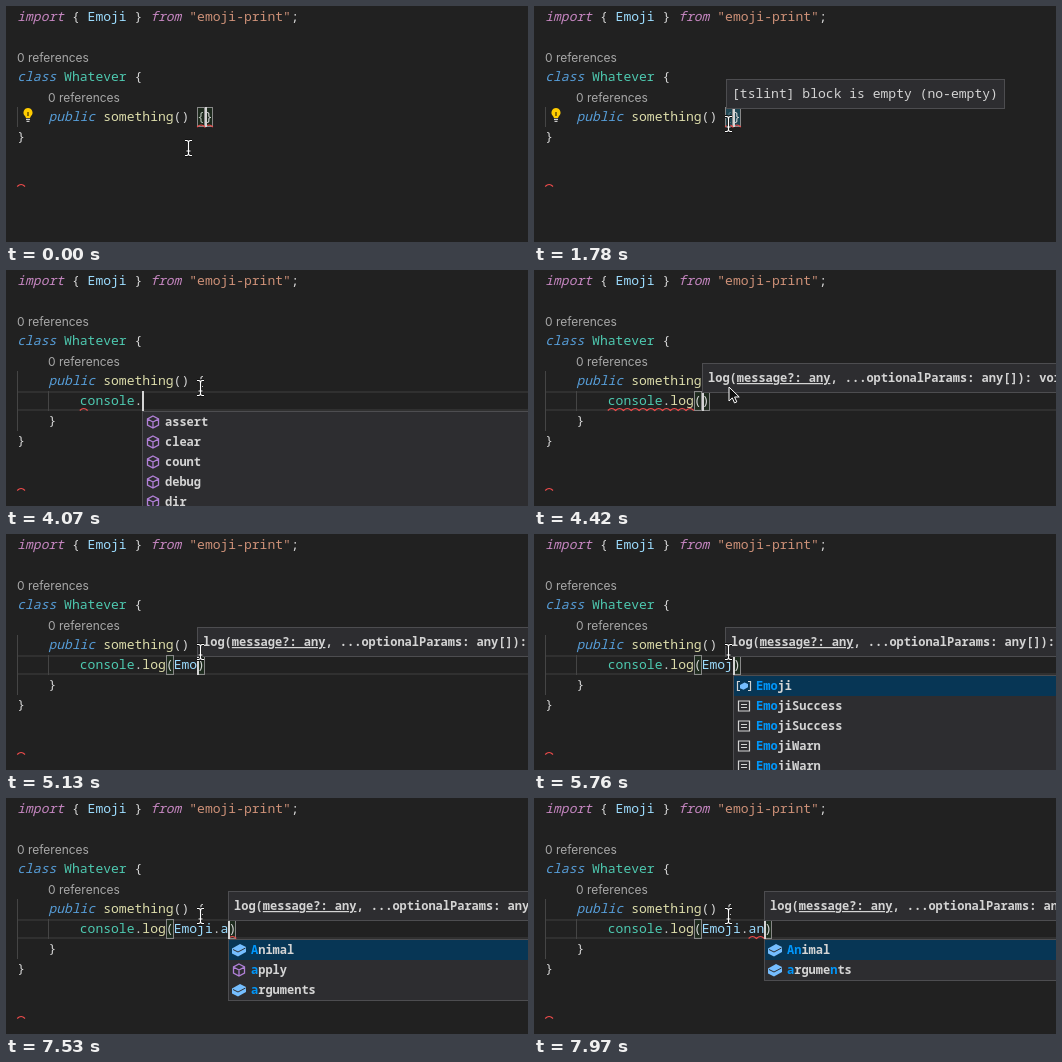
Recreate the animation shown at these times as an HTML page. Size 522 by 236 pixels, loop 8 s.

```html
<!DOCTYPE html>
<html lang="en">
<head>
<meta charset="utf-8">
<title>Code editor typing</title>
<style>
  html, body { margin: 0; width: 100%; height: 100%; overflow: hidden; background: #212121; }
  svg { display: block; width: 522px; height: 236px; }
  text { white-space: pre; font: 13.04px "Noto Sans Mono", "DejaVu Sans Mono", monospace; fill: #d4d4d4; }
  .lens { font: 12px Inter, "Open Sans", sans-serif; fill: #a8a8a8; }
  .small { font-size: 12px; font-weight: 600; }
  .kw, .mod { font-style: italic; }
  .mod { fill: #c586c0; }
  .kw { fill: #569cd6; }
  .type { fill: #4ec9b0; }
  .fn { fill: #dcdcaa; }
  .name { fill: #9cdcfe; }
  .str { fill: #ce9178; }
  .hit { fill: #0097fb; }
  .on { text-decoration: underline; }
  .squiggle { fill: none; stroke: #f14c4c; stroke-width: 1.1; }
  .pair { fill: #00640022; stroke: #888; }
  .guide { stroke: #454545; }
  .current { fill: none; stroke: #303030; stroke-width: 2; }
  .popup, .list { fill: #2d2d30; stroke: #4d4d50; }
  .picked { fill: #073655; }
</style>
</head>
<body>
<svg id="stage" viewBox="0 0 522 236"></svg>
<script>
const LOOP = 8000, CHAR = 7.824, LEFT = 11.2;
const ENTER = 2220;
const stage = document.getElementById('stage');

const TYPED = 'console.log(Emoji.an';
const KEYS = [2750, 2840, 2920, 3010, 3090, 3270, 3450, 3980, 4160, 4240, 4330, 4420,
  4680, 4860, 5040, 5760, 5840, 6290, 7440, 7620];

const CARET_OFF = [[270, 790], [1240, 1780], [2660, 2750], [6730, 7260]];

// Pointer path: time, x, y
const POINTER = [[0, 182.5, 142], [90, 183, 132], [270, 184, 131], [350, 187, 128],
  [440, 190, 124], [520, 193, 120], [610, 194.5, 118]];

// Signature hint: time, column
const HINT = [[0], [4420, 20], [4680, 21], [4860, 22], [5130, 23], [5840, 25],
  [6290, 26], [7530, 27], [7710, 28]];

const LOGGING = ['m assert', 'm clear', 'm count', 'm debug', 'm dir'];
const EMOJI = ['v Emoji', 't EmojiSuccess', 't EmojiSuccess', 't EmojiWarn', 't EmojiWarn'];
const MEMBERS = ['f Animal', 'm apply', 'f arguments', 'm bind', 'f Body'];

// Suggestions: time, column, items, query, first row selected
const LISTS = [[0],
  [4070, 16, LOGGING, '', false], [4160, 17, ['m log'], 'l', true],
  [4240, 18, ['m log'], 'lo', true], [4330, 19, ['m log'], 'log', true], [4420],
  [5760, 24, EMOJI, 'emo', true], [5840, 25, EMOJI, 'emoji', true], [6290],
  [6460, 26, MEMBERS, '', false],
  [7530, 27, MEMBERS.slice(0, 3), 'a', true],
  [7710, 28, ['f Animal', 'f arguments'], 'an', true]];

// Error underline on the typed row: time, first column, last column
const ERRORS = [[0], [3450, 8, 9], [4240, 8, 19], [4590], [6460, 20, 26], [6550, 26, 27],
  [7440, 27, 28], [7620, 28, 29], [7880], [7970, 26, 28]];

const at = (steps, t) => steps.findLast(s => s[0] <= t);
const colX = c => LEFT + c * CHAR;
const span = (cls, s) => `<tspan class="${cls}">${s}</tspan>`;
const text = (x, y, s, cls = '') => `<text x="${x}" y="${y}" class="${cls}">${s}</text>`;
const code = (col, row, s, cls) => text(colX(col), 15 + 20 * row, s, cls);
const rect = (cls, x, y, w, h) => `<rect class="${cls}" x="${x}" y="${y}" width="${w}" height="${h}"/>`;
const line = (cls, x1, y1, x2, y2) =>
  `<path class="${cls}" d="M${x1} ${y1}L${x2} ${y2}"/>`;
const pair = (col, row) => rect('pair', Math.round(colX(col)) + .5, 20 * row + 1.5, 7, 19);

// One hump per character
function squiggle(c1, c2, y) {
  let d = `M${colX(c1)} ${y + 1}`;
  for (let c = c1; c < c2; c++) d += `q${CHAR / 2}-4 ${CHAR} 0`;
  return `<path class="squiggle" d="${d}"/>`;
}

const ICONS = {
  f: `<path fill="#75beff" d="M-7-1.500L1-6L7-3V2L-1 6.500L-7 3.500Z"/>
      <path fill="none" stroke="#2d2d30" d="M-6-.5L-1 2L6.500-2"/>`,
  m: `<path fill="none" stroke="#b180d7" stroke-width="1.3"
      d="M0-6L5.5-3V3L0 6L-5.5 3V-3ZM-5.5-3L0 0L5.5-3M0 0V6"/>`,
  v: `<path fill="none" stroke="#d4d4d4" stroke-width="1.2" d="M-4-4.500H-6.500V4.500H-4M4-4.500H6.500V4.500H4"/>
      <path fill="#75beff" d="M-4-1L.5-3.500L4-2V1.200L-.5 3.800L-4 2.200Z"/>`,
  t: `<path fill="none" stroke="#d4d4d4" stroke-width="1.2"
      d="M-5.500-5H5.500V5H-5.500ZM-3-1.500H3M-3 1.500H3"/>`
};

function marked(word, query) {
  let i = 0;
  return [...word].map(ch => ch.toLowerCase() === query[i] ? (i++, span('hit', ch)) : ch).join('');
}

function list([, col, items, query, picked]) {
  if (!col) return '';
  const x = Math.round(colX(col));
  const rows = items.map((item, i) =>
    `<g transform="translate(${x + 11} ${152 + 20 * i})">${ICONS[item[0]]}</g>` +
    text(x + 23, 156 + 20 * i, marked(item.slice(2), query), 'small'));
  return rect('list', x + .5, 141.5, 430, 20 * items.length + 1) +
    (picked ? rect('picked', x + 1, 142, 430, 20) : '') + rows.join('');
}

function hint([, col]) {
  if (!col) return '';
  const x = Math.round(colX(col));
  return rect('popup', x + .5, 93.5, 430, 29) +
    text(x + 6, 112, `log(${span('on', 'message?: any')}, ...optionalParams: any[]): void`, 'small');
}

function tooltip(t) {
  if (t < 790 || t >= ENTER) return '';
  return `<g opacity="${t < 880 ? .5 : 1}">` + rect('popup', 192.5, 73.5, 278, 29) +
    text(198, 92, '[tslint] block is empty (no-empty)') + '</g>';
}

const BULB = `<path fill="#fc0" d="M22 102a4.6 4.6 0 0 0-3 8l1 2h4l1-2a4.6 4.6 0 0 0-3-8Z"/>
  <path fill="#8a6d00" d="M21 106h2v4h-2Z"/>
  <path stroke="#ccc" stroke-width="1.2" d="M20 113.4H24M20.500 115.400H23.500"/>`;

function pointer(t) {
  if (t >= 4420 && t < 5130)
    return '<path d="M195 117v14l3.300-3.100 2.200 5 2.300-1-2.200-4.900h4.600Z" fill="#111" stroke="#fff"/>';
  const [, x, y] = at(POINTER, t);
  const beam = 'd="M-3.500-7.500H-1.500L0-6.500L1.500-7.500H3.500M0-6.500V6.500M-3.500 7.500H-1.500L0 6.500L1.500 7.500H3.500M-2 3H2"';
  return `<g transform="translate(${x} ${y})" fill="none">
    <path ${beam} stroke="#111" stroke-width="3"/><path ${beam} stroke="#fff" stroke-width="1.2"/></g>`;
}

const HEADER =
  code(0, 0, `${span('mod', 'import')} { ${span('name', 'Emoji')} } ${span('mod', 'from')} ${span('str', '"emoji-print"')};`) +
  text(11, 56, '0 references', 'lens') +
  code(0, 3, `${span('kw', 'class')} ${span('type', 'Whatever')} {`) +
  text(42, 96, '0 references', 'lens') +
  code(4, 5, `${span('kw', 'public')} ${span('fn', 'something')}() {`);

function emptyBody(t) {
  return line('guide', 11.5, 101, 11.5, 121) +
    (t >= 790 ? '<rect x="192" y="101" width="15" height="20" fill="#264f78" opacity=".7"/>' : '') +
    pair(23, 5) + pair(24, 5) + code(24, 5, '}') + squiggle(23, 25, 120) +
    code(0, 6, '}') + squiggle(0, 1, 179.5);
}

function filledBody(t, n) {
  const done = TYPED.slice(0, n);
  const open = n > 11;
  const rowEnd = t < 3980 ? 199 : 522;
  return (t >= 2660 ? line('current', 11, 122, rowEnd, 122) + line('current', 11, 140, rowEnd, 140) : '') +
    line('guide', 11.5, 101, 11.5, 161) + line('guide', 42.5, 121, 42.5, 141) +
    (open ? pair(19, 6) + pair(8 + n, 6) : '') +
    code(8, 6, span(n < 7 ? 'name' : 'type', done.slice(0, 7)) + done.slice(7, 8) +
      span('fn', done.slice(8, 11)) + done.slice(11, 12) + span('name', done.slice(12, 17)) +
      done.slice(17, 18) + span('name', done.slice(18)) + (open ? ')' : '')) +
    code(4, 7, '}') + code(0, 8, '}') + squiggle(0, 1, 219.5);
}

function caret(t, n) {
  if (CARET_OFF.some(([a, b]) => t >= a && t < b)) return '';
  const [col, y] = t < ENTER ? [24, 101] : [8 + n, 121];
  return `<rect x="${Math.round(colX(col))}" y="${y}" width="2" height="20" fill="#d4d4d4"/>`;
}

function draw(t) {
  const n = KEYS.filter(k => k <= t).length;
  const [, c1, c2] = at(ERRORS, t);
  return HEADER + (t < ENTER ? emptyBody(t) : filledBody(t, n)) +
    (t < 2400 ? BULB : '') + (c2 ? squiggle(c1, c2, 139.5) : '') + caret(t, n) +
    tooltip(t) + hint(at(HINT, t)) + list(at(LISTS, t)) + pointer(t);
}

let shown = '';
const start = performance.now();
function tick() {
  const next = draw((performance.now() - start) % LOOP);
  if (next !== shown) stage.innerHTML = shown = next;
  requestAnimationFrame(tick);
}
tick();
</script>
</body>
</html>
```
